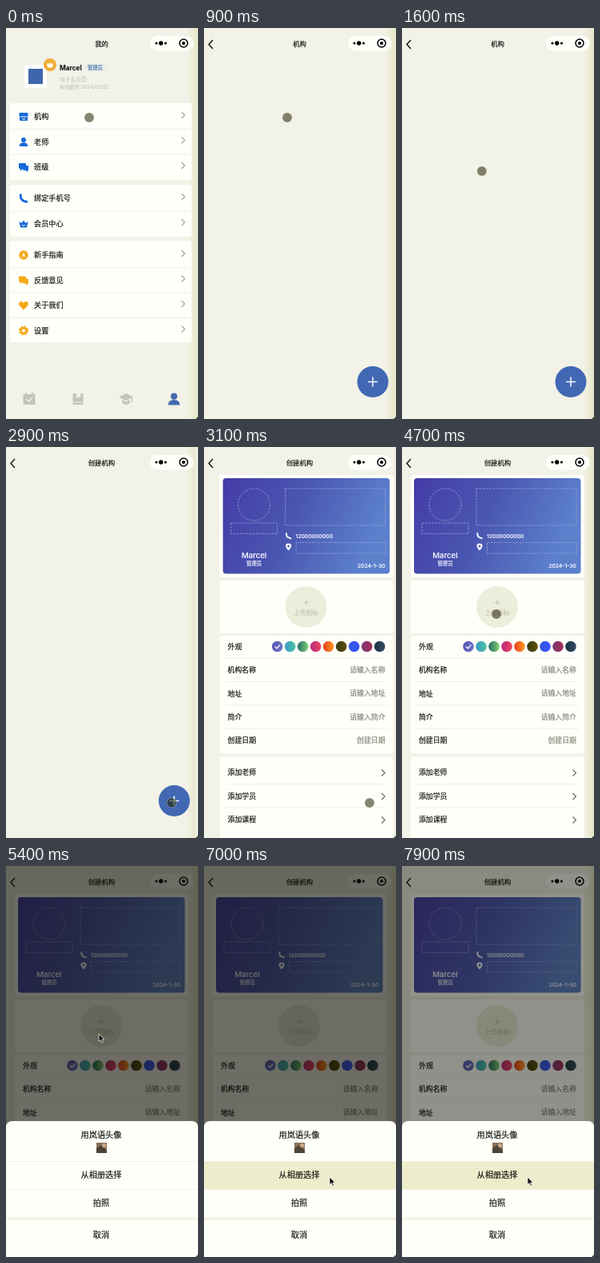
Animation of 240x489 px, one loop 8000 ms. Source, as an HTML page:

```html
<!DOCTYPE html>
<html lang="zh-CN">
<head>
<meta charset="utf-8">
<title>机构</title>
<style>
html, body { margin: 0; width: 100%; height: 100%; overflow: hidden; background: #f2f2e8; }
svg { display: block; width: 100vw; height: 100vh; }
text { font-family: Inter, "Noto Sans CJK SC", "Noto Sans CJK", "Noto Sans", sans-serif; font-weight: 500; }
</style>
</head>
<body>
<svg id="stage" viewBox="0 0 240 489" preserveAspectRatio="none"></svg>
<script>
const LOOP = 8000;
const INK = '#12120f', BLUE = '#1768d8', ORANGE = '#f4a814';
const GROUND = '#f2f2e8', PAPER = '#fffffa', LINE = '#ededdf';
const stage = document.getElementById('stage');

const rect = (x, y, w, h, fill, r = 0, more = '') =>
  `<rect x="${x}" y="${y}" width="${w}" height="${h}" rx="${r}" fill="${fill}" ${more}/>`;
const circle = (x, y, r, fill, more = '') =>
  `<circle cx="${x}" cy="${y}" r="${r}" fill="${fill}" ${more}/>`;
const stroke = (d, color, w = 1, more = '') =>
  `<path d="${d}" fill="none" stroke="${color}" stroke-width="${w}" ${more}/>`;
const fill = (d, color) => `<path d="${d}" fill="${color}"/>`;
// y is the vertical centre of the glyphs; the hairline stroke gives a medium weight
const text = (s, x, y, size, color = INK, anchor = 'start', more = '') =>
  `<text x="${x}" y="${y + size * 0.37}" font-size="${size}" fill="${color}" stroke="${color}" stroke-width=".18" text-anchor="${anchor}" ${more}>${s}</text>`;
const at = (x, y, body, scale = 1) => `<g transform="translate(${x} ${y}) scale(${scale})">${body}</g>`;
const group = (id, body) => `<g id="${id}">${body}</g>`;
const page = (id, body) =>
  group(id, rect(0, 0, 240, 489, GROUND) + rect(226, 0, 14, 489, 'url(#edge)') + body);
const chevron = (x, y) => stroke(`M${x - 2} ${y - 4}l4 4l-4 4`, '#a3a39a', 1.1);

const person = c => circle(0, -2.5, 3, c) + fill('M-5.5 5.5Q-5 .8 0 .8Q5 .8 5.5 5.5Z', c);
const phone = c => stroke('M-3.7 -4.3Q-4.5 3.3 4 4.4', c, 2.8, 'stroke-linecap="round"');
const crown = c => fill('M-5.5 -3L-2.5 -1L0 -4.5L2.5 -1L5.5 -3L4 4.5H-4Z', c);
const chat = c => rect(-6, -5, 9, 7, c, 1) + rect(-1, -2, 7, 6, c, 1) + fill('M-4 1v4l4-4ZM5 3v3l-4-3Z', c);

const icons = {
  shop: rect(-5, -1, 10, 6, BLUE, 1) + rect(-5.5, -5, 11, 4.5, BLUE, 1.2) + stroke('M-4 0H4M-2 3H2', '#fff', 1),
  person: person(BLUE),
  chat: chat(BLUE),
  phone: phone(BLUE),
  crown: crown(BLUE) + stroke('M-2 1L0 2.5L2 1', '#fff', 1),
  guide: circle(0, 0, 5.7, ORANGE) + stroke('M-2 2.5L0 -2.5L2 2.5M-1 1H1', '#fff', 1),
  note: chat(ORANGE),
  heart: fill('M0 5.5L-5 .5C-8 -4 -2.5 -7.5 0 -3C2.5 -7.5 8 -4 5 .5Z', ORANGE),
  gear: circle(0, 0, 4.6, ORANGE) + circle(0, 0, 5.2, 'none', `stroke="${ORANGE}" stroke-width="1.8" stroke-dasharray="2.4 1.68"`) + circle(0, 0, 2, '#fff')
};

function menuCard(y, h, rows) {
  return rect(5, y, 227, h, PAPER, 3) + rows.map(([icon, label, cy], i) =>
    at(22, cy, icons[icon]) + text(label, 35, cy, 9.2) + chevron(221.5, cy - 2) +
    (i ? stroke(`M6 ${cy - 16}H231`, LINE, 0.8) : '')).join('');
}

function profileBody() {
  const gray = '#c3c4ba';
  return rect(23, 46, 28, 29, '#fff', 3) + rect(28, 51, 18, 19, '#3f66ab') +
    circle(55, 46, 8, '#f1ac39') + at(55, 46, crown('#fffbe8'), 0.75) +
    text('Marcel', 67, 49.5, 8.4, INK, 'start', 'style="font-weight:600"') +
    rect(99, 45, 25, 9, '#e9eeea', 2) + text('管理员', 102, 49.5, 6.3, '#4c76aa') +
    text('电子名片', 67, 64, 6.8, '#c9c9be') + stroke('M95 61h4v6h-4zM97 64l3-3', '#c3c4b4', 0.8) +
    text('有效期至:2024/02/12', 67, 74, 6.2, '#c9c9be') +
    menuCard(94, 96, [['shop', '机构', 111], ['person', '老师', 142.5], ['chat', '班级', 174]]) +
    menuCard(196, 65, [['phone', '绑定手机号', 213], ['crown', '会员中心', 245]]) +
    menuCard(266, 127, [['guide', '新手指南', 284], ['note', '反馈意见', 315.5], ['heart', '关于我们', 347], ['gear', '设置', 378.5]]) +
    at(29, 464, rect(-7.5, -6, 15, 13, gray, 1.5) + stroke('M-4 -8v4M4 -8v4', gray, 2) + stroke('M-3.5 0L-.5 3L4 -2', GROUND, 1.4)) +
    at(90, 464, rect(-6.5, -7, 13, 14, gray, 1) + fill('M-2 -7h5v6l-2.5-2l-2.5 2z', GROUND) + stroke('M-6 4H6', GROUND, 1)) +
    at(150, 464, fill('M-9 -2.5L0 -7L9 -2.5L0 2Z', gray) + fill('M-5 1L0 3.5L5 1V5Q0 9 -5 5Z', gray) + stroke('M7.5 -2V4', gray, 1.2)) +
    at(210, 464, person('#426aad'), 1.35);
}

function businessCard() {
  const dashed = 'stroke="#9da3d7" stroke-width=".8" stroke-dasharray="2.5 1.5"';
  const pale = '#f4f4ff';
  return rect(11, 35, 217, 128, PAPER, 3) + rect(15, 39, 208.5, 119.5, 'url(#cardBlue)', 4) +
    circle(54, 72, 20, 'none', dashed) + rect(25, 95, 58, 13.5, 'none', 0, dashed) +
    rect(93, 52, 125, 46, 'none', 0, dashed) + rect(106.5, 119.5, 112, 13.5, 'none', 0, dashed) +
    at(97, 111, phone(pale), 0.72) +
    fill('M97 129.5C91 123.5 93.5 120.5 97 120.5S103 123.5 97 129.5Z', pale) + circle(97, 124, 1.3, '#4b55ad') +
    text('12000000000', 106, 111, 6.8, pale) +
    text('Marcel', 54, 135.5, 9.6, pale, 'middle') + text('管理员', 54, 146, 6.4, pale, 'middle') +
    text('2024-1-30', 218, 148.5, 6.8, pale, 'end');
}

function formBody() {
  const swatches = [['#5a55b5', '#6272c0'], ['#3d9bc4', '#48c4a4'], ['#216c68', '#83cf72'], ['#b52c78', '#ef4263'],
    ['#e63d20', '#ff9c20'], ['#343a10', '#62510c'], ['#3156df', '#3b55ff'], ['#793775', '#a72d54'], ['#17333f', '#354d65']];
  const fields = [['机构名称', '请输入名称'], ['地址', '请输入地址'], ['简介', '请输入简介'], ['创建日期', '创建日期']];
  const gradients = swatches.map(([a, b], i) =>
    `<linearGradient id="tone${i}"><stop stop-color="${a}"/><stop offset="1" stop-color="${b}"/></linearGradient>`).join('');
  return `<defs>${gradients}</defs>` + businessCard() +
    rect(11, 167, 217, 66, PAPER, 3) + circle(119, 200, 26, '#ededdc') +
    stroke('M115.5 194.5h7M119 191v7', '#c0c0ac', 0.9) + text('上传图标', 119, 207.5, 7.7, '#c5c5b2', 'middle') +
    rect(11, 236, 217, 147, PAPER, 3) + text('外观', 21, 249.5, 9) +
    swatches.map((_, i) => circle(83 + i * 16, 249.5, 6.8, `url(#tone${i})`)).join('') +
    stroke('M80 249.5l2.3 2.5l4-4.5', '#fff', 1.2) +
    fields.map(([label, hint], i) => {
      const y = 279 + i * 29.4;
      return stroke(`M18 ${y - 15}H222`, LINE, 0.8) + text(label, 21, y, 8.9) + text(hint, 218, y - 0.5, 8.9, '#85857a', 'end');
    }).join('') +
    rect(11, 387.5, 217, 104, PAPER, 3) +
    ['添加老师', '添加学员', '添加课程'].map((label, i) => {
      const y = 407 + i * 29.5;
      return text(label, 21, y, 8.9) + stroke(`M213.5 ${y - 3.5}l4 4l-4 4`, '#66665b', 1.1) +
        (i ? stroke(`M18 ${y - 15}H222`, LINE, 0.8) : '');
    }).join('');
}

function actionSheet() {
  const option = (s, y) => text(s, 119, y, 10.2, INK, 'middle');
  return fill('M0 489V327Q0 319 8 319H232Q240 319 240 327V489Z', PAPER) +
    rect(0, 369.5, 240, 35, '#ededcc', 0, 'id="hover"') +
    stroke('M0 369.5H240M0 404.5H240', LINE, 0.8) + rect(0, 439, 240, 4, '#f3f3e6') +
    option('用岚语头像', 336) + rect(113, 346, 13, 13, '#8b7156') + fill('M113 359V353l6-4l7 7v3Z', '#4d4438') +
    rect(120, 347, 5, 5, '#c9a988', 2) +
    option('从相册选择', 386.5) + option('拍照', 421.5) + option('取消', 461);
}

function header() {
  return text('', 119.5, 20, 8.4, INK, 'middle', 'id="title"') +
    group('back', stroke('M11 15L6 20.5L11 26', INK, 1.4)) +
    rect(180, 10, 54.5, 18.5, PAPER, 9.2) +
    circle(188, 19, 1.6, '#000') + circle(193.7, 19, 2.7, '#000') + circle(199.4, 19, 1.6, '#000') +
    circle(222, 19, 5, 'none', 'stroke="#000" stroke-width="1.5"') + circle(222, 19, 2.1, '#000');
}

stage.innerHTML = `<defs>
  <linearGradient id="edge"><stop stop-color="#e4e4c0" stop-opacity="0"/><stop offset="1" stop-color="#e4e4c0" stop-opacity=".8"/></linearGradient>
  <linearGradient id="cardBlue" x2="1" y2=".25"><stop stop-color="#443ca7"/><stop offset=".5" stop-color="#4a57b1"/><stop offset="1" stop-color="#5c80cc"/></linearGradient>
  </defs>` +
  page('profile', profileBody()) +
  page('list', circle(211, 442.5, 19.5, '#4268b4') + stroke('M205 442.5h12M211 436.5v12', '#f5f7ff', 1.6)) +
  page('form', formBody()) +
  header() + rect(0, 0, 240, 489, '#0c0c04', 0, 'id="shade"') + group('sheet', actionSheet()) +
  fill('M240 486V489H237Z', '#3e4c2b') +
  group('touch', circle(0, 0, 6, '#1c1c00', 'fill-opacity=".54" stroke="#d8d8b0" stroke-width=".6" stroke-opacity=".6"')) +
  group('arrow', `<path d="M0 0V9.5L2.2 7.6L3.8 11L5.4 10.2L3.8 7H6.8Z" fill="#111" stroke="#fff" stroke-width=".7"/>`);

const part = id => document.getElementById(id);
const show = (id, on) => part(id).setAttribute('display', on ? 'inline' : 'none');
const place = (id, x, y) => part(id).setAttribute('transform', `translate(${x} ${y})`);
const progress = (t, from, to) => Math.min(1, Math.max(0, (t - from) / (to - from)));
const smooth = u => u * u * (3 - 2 * u);

// Each hand movement is one arc: [start, end, from, bend, to].
const toAdd = [1200, 2500, [104, 112], [77, 254], [207, 445]];
const toUpload = [3200, 4400, [207, 445], [140, 356], [118, 209]];
const toAlbum = [5600, 6800, [116, 210], [140, 290], [157, 389]];

function along([start, end, from, bend, to], t) {
  const e = smooth(progress(t, start, end));
  return [0, 1].map(k => (1 - e) ** 2 * from[k] + 2 * e * (1 - e) * bend[k] + e * e * to[k]);
}

const PUSH = 300, LIST_AT = 500, FORM_AT = 2900, SHEET_AT = 5400;

// The new page slides in from the right while the old one drifts left.
function push(oldPage, newPage, t, start) {
  const e = 1 - (1 - progress(t, start, start + PUSH)) ** 3;
  place(oldPage, -72 * e, 0);
  place(newPage, 240 * (1 - e), 0);
}

function render(t) {
  const sheetOpen = t >= SHEET_AT;
  part('title').textContent = t < LIST_AT ? '我的' : t < FORM_AT - 100 ? '机构' : '创建机构';
  show('back', t >= LIST_AT);
  if (t < FORM_AT) {
    push('profile', 'list', t, LIST_AT);
    place('form', 240, 0);
  } else push('list', 'form', t, FORM_AT);
  ['sheet', 'shade', 'arrow'].forEach(id => show(id, sheetOpen));
  show('touch', !sheetOpen);
  part('shade').setAttribute('opacity', t < 7200 ? 0.6 : 0.45);
  const pointer = along(sheetOpen ? toAlbum : t < FORM_AT ? toAdd : toUpload, t);
  place(sheetOpen ? 'arrow' : 'touch', ...pointer);
  show('hover', pointer[1] > 370);
}

const start = performance.now();
function tick() {
  render((performance.now() - start) % LOOP);
  requestAnimationFrame(tick);
}
tick();
</script>
</body>
</html>
```
